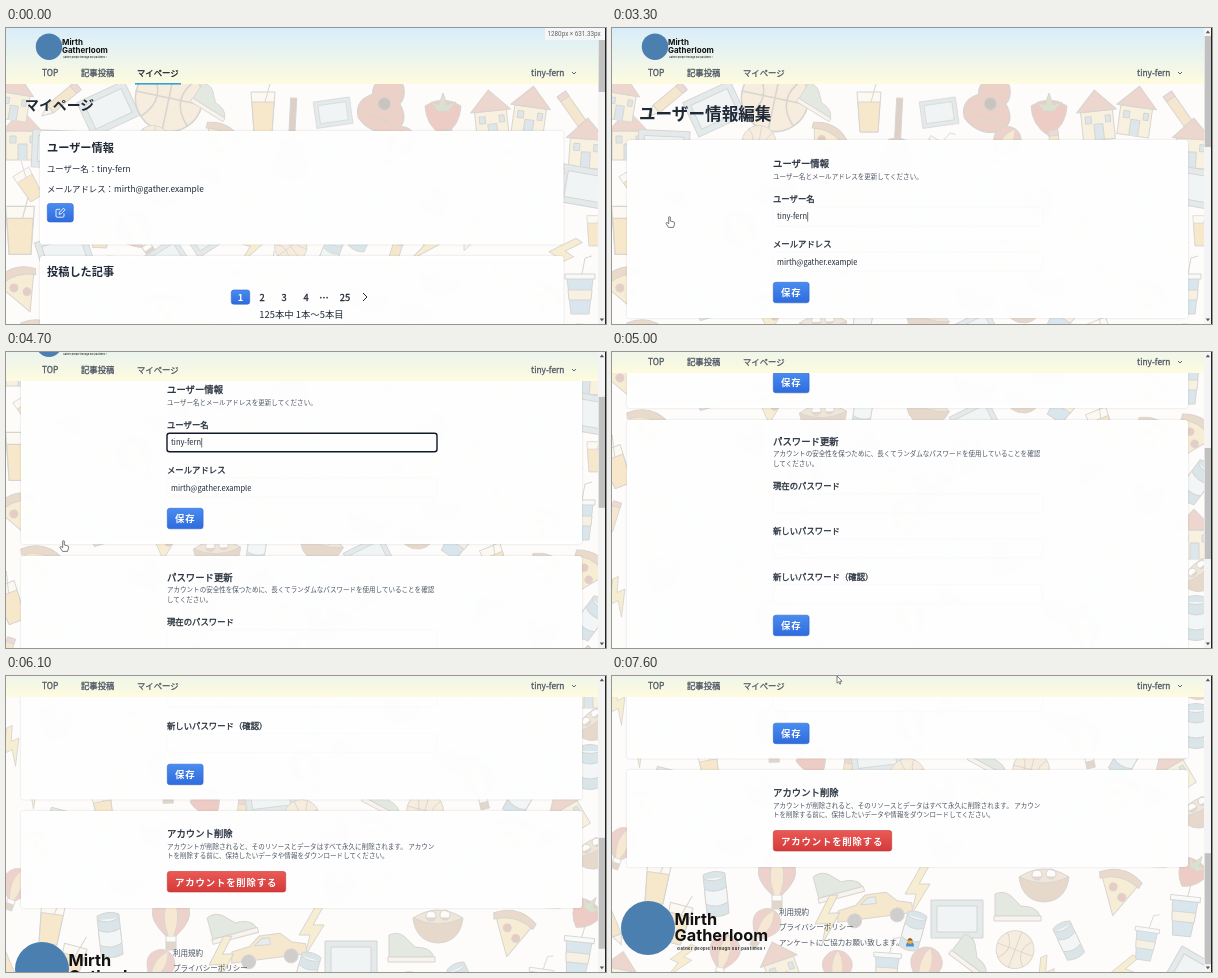
An HTML page that plays this animation: 600x296 px, repeating every 7700 ms.

```html
<!DOCTYPE html>
<html lang="ja">
<head>
<meta charset="utf-8">
<title>マイページ</title>
<style>
html, body { margin: 0; width: 100%; height: 100%; overflow: hidden; background: #fff; }
svg { display: block; width: 100vw; height: 100vh; }
text { font-family: "Noto Sans CJK JP", "Noto Sans CJK", "Noto Sans", sans-serif; white-space: pre; }
.brand text { font-family: Inter, sans-serif; font-weight: 700; }
.card { fill: #fffffff8; filter: drop-shadow(0 .8px 1.2px #0002); }
.doodle { stroke: #85796c; stroke-width: 1; stroke-linejoin: round; filter: saturate(.75); }
</style>
</head>
<body>
<svg viewBox="0 0 600 296">
  <defs>
    <linearGradient id="sky" x2="0" y2="1"><stop stop-color="#d8edfb"/><stop offset="1" stop-color="#fefbdf"/></linearGradient>
    <linearGradient id="blue" x2="0" y2="1"><stop stop-color="#4a8cf0"/><stop offset="1" stop-color="#2f6bdc"/></linearGradient>
    <linearGradient id="red" x2="0" y2="1"><stop stop-color="#ea5a55"/><stop offset="1" stop-color="#d43a3a"/></linearGradient>
  </defs>
  <rect width="600" height="296" fill="#fdfcfb"/>
  <g id="scroller"><g id="doodles" opacity=".3"></g><g id="profile"></g><g id="edit"></g></g>
  <g id="head"></g>
  <g id="bar"></g>
  <g id="size"></g>
  <path id="arrow" d="M0 0V7.2L1.7 5.7 2.8 8.2 3.9 7.7 2.8 5.3H5Z" fill="#fff" stroke="#333" stroke-width=".6"/>
  <path id="hand" d="M-.8 0Q0-.8.8 0V4L4.6 5Q5.3 5.4 5 7.2L4 10.4H-1L-3.4 6.6Q-3.6 5.2-2 5.8L-.8 6.8Z" fill="#fff" stroke="#444" stroke-width=".7"/>
</svg>
<script>
const $ = id => document.getElementById(id);
const INK = "#1f2937", GRAY = "#4b5563", USER = "tiny-fern", MAIL = "mirth@gather.example";

// Text placed by its left edge and vertical middle; medium weight is a thin outline
const text = (x, mid, size, str, weight = 400, fill = INK, extra = "") =>
  `<text x="${x}" y="${mid + size * .38}" font-size="${size}" font-weight="${weight == 500 ? 400 : weight}" fill="${fill}" ${
    weight == 500 ? `stroke="${fill}" stroke-width="${size * .03}"` : ""} ${extra}>${str}</text>`;
const box = (x, y, w, h, r, attrs) => `<rect x="${x}" y="${y}" width="${w}" height="${h}" rx="${r}" ${attrs}/>`;
const card = (x, y, w, h) => box(x, y, w, h, 3, 'class="card"');
const button = (x, y, w, h, hue) =>
  box(x, y, w, h, 2.5, `fill="url(#${hue})" stroke="${hue == "red" ? "#c63434" : "#2c66cf"}" stroke-width=".6"`);
const path = (d, attrs) => `<path d="${d}" ${attrs}/>`;
const brand = (x, y, k) => `<g class="brand" transform="translate(${x} ${y}) scale(${k})">
  <circle r="27" fill="#4a7fb0"/>
  ${text(26.5, -9.5, 16.3, "Mirth", 700, "#111")}${text(26.5, 6.5, 16.3, "Gatherloom", 700, "#111")}
  ${text(29, 20.7, 4, "Gather people through our pastimes !", 600, "#222", 'letter-spacing=".45"')}</g>`;

// Background doodles, each about 45 px tall around its own origin
const shape = (d, fill) => path(d, `fill="${fill}"`);
const kinds = {
  ball: shape("M-21 0a21 21 0 1 0 42 0a21 21 0 1 0-42 0", "#f6c98a") + shape("M-21 0H21M0-21V21M-15-15Q0 0-15 15M15-15Q0 0 15 15", "none"),
  glass: shape("M-12-18H12L9 22H-9Z", "#fbf0d2") + shape("M-11-8H11L9 22H-9Z", "#f7b93c") + shape("M2-8L8-30", "none"),
  house: shape("M-16-5H16V24H-16Z", "#f7d58d") + shape("M-20-5L0-26 20-5Z", "#d9775a") + shape("M-4 24V8H5V24M-12 0H-6V7H-12ZM8 0H13V7H8Z", "#8db3c9"),
  guitar: shape("M-3-10H3V-52H-3Z", "#9a6843") + shape("M-9-10Q0-14 9-10Q14-2 11 4Q23 14 15 25Q0 35-15 25Q-23 14-11 4Q-14-2-9-10", "#d9683e") + shape("M-5 8a5 5 0 1 0 10 0a5 5 0 1 0-10 0M-7 20H7", "#5b3b2b"),
  pencil: shape("M-5-22H5V14H-5Z", "#f2b544") + shape("M-5 14H5L0 25Z", "#f3dfc2") + shape("M-5-22H5V-16H-5Z", "#e5817a"),
  pizza: shape("M-20-14Q0-26 20-14L2 24Z", "#f6c75d") + shape("M-22-15Q0-30 22-15L20-9Q0-20-20-9Z", "#c98748") + shape("M-9-4a4 4 0 1 0 8 0a4 4 0 1 0-8 0M2 4a4 4 0 1 0 8 0a4 4 0 1 0-8 0", "#d5513f"),
  cup: shape("M-13-12H13L9 24H-9Z", "#79b6d8") + shape("M-15-16H15V-11H-15Z", "#eef4f5") + shape("M2-16L5-32 12-34", "none") + shape("M-12 0H12L11 10H-11Z", "#f3d69b"),
  can: shape("M-11-20Q0-25 11-20V20Q0 25-11 20Z", "#7fb0cb") + shape("M-11-16Q0-11 11-16M-11-6Q0 0 11-6V9Q0 15-11 9Z", "#d8e8ee"),
  balloon: shape("M-5 14Q-22-2-18-14Q-12-27 0-27Q12-27 18-14Q22-2 5 14Z", "#e26650") + shape("M-3 14Q-12-10 0-27Q12-10 3 14", "#f5b85d") + shape("M-5 20H5V28H-5ZM-5 14V20M5 14V20", "#a97a4c"),
  car: shape("M-38 9L-36-2-18-5-7-14H14L24-4 38 0V10Z", "#f3b83f") + shape("M-13-5L-5-11H3V-4Z", "#a7cbd9") + shape("M-28 10a7 7 0 1 0 14 0a7 7 0 1 0-14 0M15 10a7 7 0 1 0 14 0a7 7 0 1 0-14 0", "#65615e"),
  tablet: shape("M-26-18H26V20H-26Z", "#a3bfca") + shape("M-20-12H20V14H-20Z", "#d3e2e7"),
  bowl: shape("M-25-4Q-22 20 0 21Q22 20 25-4Z", "#c08450") + shape("M-25-4Q0-20 25-4Q0 8-25-4M-12-6a5 5 0 1 0 10 0a5 5 0 1 0-10 0M2-7a5 5 0 1 0 10 0a5 5 0 1 0-10 0", "#d9ad78"),
  boot: shape("M-22 12V-10Q-13-14-6-8L4 2Q20 2 23 12Z", "#a6b9a0") + shape("M-23 12H24V17H-23Z", "#efe2cc"),
  berry: shape("M-18-8Q0-20 18-8Q17 12 0 22Q-17 12-18-8", "#e7553f") + shape("M-12-12L-4-9 0-21 4-9 13-12 5-3H-5Z", "#86a957"),
  bolt: shape("M4-24L-12 4H-1L-6 25 13-6H2L12-24Z", "#f7cc55")
};
const places = `house 16 108 0,pencil 55 72 50,tablet 102 80 -25,ball 163 70 12 1.6,glass 257 82 0,guitar 285 122 3,tablet 327 84 -8 .7,
guitar 382 66 20 1.3,berry 437 86 0,house 485 88 -6,house 524 84 8,pencil 568 84 -35,house 580 116 4,glass 14 200 0 1.2,pizza 14 262 -20,
tablet 580 158 10,cup 574 262 0,house 582 417 0,can 584 500 0,glass 45 655 8,can 104 668 -6,balloon 165 655 0,boot 225 655 -15,
car 262 682 -8,bolt 305 664 0,tablet 345 692 0,bowl 432 655 0,boot 405 678 0,pizza 505 666 15,cup 572 686 6`
  .split(",").map(p => p.trim().split(" "));

// Seeded doodles fill every spot that is still free
let seed = 7;
const rand = () => (seed = seed * 16807 % 2147483647) / 2147483647;
const names = Object.keys(kinds).filter(k => k != "guitar" && k != "car");
for (let i = 0; i < 4000; i++) {
  const x = rand() * 592, y = 62 + rand() * 690;
  if (places.every(p => Math.hypot(p[1] - x, p[2] - y) > 37))
    places.push([names[rand() * names.length | 0], x, y, rand() * 80 - 40, .75 + rand() * .25]);
}
$("doodles").innerHTML = '<g class="doodle">' + places.map(([kind, x, y, turn, k = 1]) =>
  `<g transform="translate(${x} ${y}) rotate(${turn}) scale(${k})">${kinds[kind]}</g>`).join("") + "</g>";

$("head").innerHTML = box(0, 0, 592, 56, 0, 'fill="url(#sky)"') + brand(43, 18.7, .49)
  + text(36, 45, 8.4, "TOP", 500, GRAY) + text(75, 45, 8.4, "記事投稿", 500, GRAY)
  + `<g id="here">${text(131, 45, 8.4, "マイページ", 500, "currentColor")}</g>`
  + box(129, 55, 46, 1.6, 0, 'id="underline" fill="#2ea3dc"')
  + text(525, 45, 8.4, USER, 500, GRAY)
  + path("M566 44L568 46 570 44", `fill="none" stroke="${GRAY}" stroke-width=".9"`);

const pages = [[256, "2"], [278, "3"], [300, "4"], [318, "…"], [339, "25"]];
$("profile").innerHTML = text(19, 77, 13.9, "マイページ", 700)
  + card(34, 103, 523.5, 113.5) + text(41, 120, 11.2, "ユーザー情報", 700)
  + text(41, 141, 8.4, "ユーザー名：" + USER) + text(41, 161.3, 8.4, "メールアドレス：" + MAIL)
  + button(41.3, 175.5, 26, 18.5, "blue") + box(41.3, 175.5, 26, 18.5, 2.5, 'id="hover" fill="#1d48b4"')
  + path("M54 181.3H51.2Q50 181.3 50 182.5V188Q50 189.2 51.2 189.2H56.8Q58 189.2 58 188V185.4M53 186.3L53.5 184.2 57.5 180.2 59.1 181.8 55.1 185.8Z", 'fill="none" stroke="#fff" stroke-width=".9" stroke-linejoin="round"')
  + card(34, 228, 523.5, 120) + text(41, 243.5, 11.2, "投稿した記事", 700)
  + button(225.3, 262, 18.4, 14.2, "blue") + text(234.5, 269.7, 9.4, "1", 700, "#fff", 'text-anchor="middle"')
  + pages.map(([x, s]) => text(x, 269.7, 9.4, s, 500, INK, 'text-anchor="middle"')).join("")
  + path("M357 265L361 269 357 273", `fill="none" stroke="${INK}"`)
  + text(295.5, 286.6, 9.4, "125本中 1本〜5本目", 400, INK, 'text-anchor="middle"');

const field = (y, label) => text(161, y, 8.4, label, 500) + box(161, y + 8, 270, 19, 3, 'fill="none" stroke="#f8f8fa" stroke-width=".6"');
const save = y => button(161.3, y, 35.8, 20.5, "blue") + text(169, y + 10.5, 9.4, "保存", 700, "#fff", 'letter-spacing=".8"');
const note = (y, str) => text(161, y, 6.54, str, 400, GRAY);
$("edit").innerHTML = text(27, 86, 16.6, "ユーザー情報編集", 700)
  + card(15, 112, 561, 178) + text(161, 135, 9.4, "ユーザー情報", 500)
  + note(148.5, "ユーザー名とメールアドレスを更新してください。")
  + field(171, "ユーザー名") + box(161, 179.2, 270, 18.6, 2.5, 'id="ring" fill="none" stroke="#111827" stroke-width="1.4"')
  + text(165, 188.5, 7.5, USER) + path("M195.7 184V193.5", 'stroke="#111" stroke-width=".6"')
  + field(216, "メールアドレス") + text(165, 234, 7.5, MAIL) + save(254.3)
  + card(15, 302, 561, 230.5) + text(161, 323, 9.4, "パスワード更新", 500)
  + note(336, "アカウントの安全性を保つために、長くてランダムなパスワードを使用していることを確認") + note(345.5, "してください。")
  + field(368, "現在のパスワード") + field(413, "新しいパスワード") + field(458.5, "新しいパスワード（確認）") + save(497.2)
  + card(15, 544, 561, 97) + text(161, 566.3, 9.4, "アカウント削除", 500)
  + note(579.3, "アカウントが削除されると、そのリソースとデータはすべて永久に削除されます。 アカウン")
  + note(588.8, "トを削除する前に、保持したいデータや情報をダウンロードしてください。")
  + button(161.3, 604.5, 118.4, 20.5, "red") + text(169, 615, 9.4, "アカウントを削除する", 700, "#fff", 'letter-spacing=".85"')
  + brand(36, 702, 1)
  + text(167, 686, 7.5, "利用規約", 400, GRAY) + text(167, 701, 7.5, "プライバシーポリシー", 400, GRAY)
  + text(167, 716, 7.4, "アンケートにご協力お願い致します。", 400, GRAY)
  + '<path d="M294 720.5Q294 715.5 298 715.5T302 720.5Z" fill="#4b8fcf"/><circle cx="298" cy="715" r="2.8" fill="#f2b53f"/><path d="M295.2 714.5Q298 709.5 300.8 714.5Z" fill="#8a5a3a"/>';

$("bar").innerHTML = box(592, 0, 8, 296, 0, 'fill="#f4f4f4"') + box(592.7, 8, 6.3, 56, 0, 'id="thumb" fill="#c1c1c1"')
  + path("M593.7 5.2L595.9 2.6 598.1 5.2ZM593.7 290.6L595.9 293.2 598.1 290.6Z", 'fill="#555"')
  + box(599, 0, 1, 296, 0, 'fill="#222"');
$("size").innerHTML = box(539, 0, 60, 12, 0, 'fill="#f5f6f7"') + text(541.5, 6, 6.3, "1280px × 631.33px", 400, "#666", 'style="font-family:Roboto,sans-serif"');

// Piecewise linear value through [time, value] pairs
function along(keys, t) {
  const i = keys.findIndex(k => k[0] > t);
  if (i == 0) return keys[0][1];
  if (i < 0) return keys[keys.length - 1][1];
  const [[t0, a], [t1, b]] = [keys[i - 1], keys[i]];
  return a + (b - a) * (t - t0) / (t1 - t0);
}
const scrollKeys = [[4300, 0], [4500, 40], [4700, 98], [4900, 205], [5000, 234], [5200, 234], [5300, 265], [5400, 281], [5500, 281],
  [5600, 317], [5800, 366], [5900, 375], [6000, 375], [6100, 409], [6200, 438], [6300, 450]];
const headKeys = [[4300, 0], [4700, 27], [4800, 35]];
const show = (id, on) => $(id).setAttribute("display", on ? "inline" : "none");
const move = (id, x, y) => $(id).setAttribute("transform", `translate(${x} ${y})`);

function draw(now) {
  const t = Math.floor(now % 7700 / 100) * 100;
  const editing = t >= 3300, scroll = along(scrollKeys, t);
  show("size", t < 800);
  show("profile", !editing);
  show("edit", editing);
  show("underline", !editing);
  show("ring", t >= 3400);
  $("here").setAttribute("color", editing ? GRAY : "#111827");
  $("hover").setAttribute("opacity", along([[1700, 0], [1900, .65]], t));
  move("scroller", 0, -scroll);
  move("head", 0, -along(headKeys, t));
  $("thumb").setAttribute("y", 8 + scroll * .376);
  $("thumb").setAttribute("height", editing ? 111 : 56);

  const leaving = t >= 7100;
  show("arrow", t >= 1000 && t < 1700 || leaving);
  show("hand", t >= 1700 && t < 5000);
  const p = leaving ? (t - 7100) / 500 : (t - 1000) / 700, ease = p * (2 - p);
  if (leaving) move("arrow", 57 + 168 * ease, 189 - 189 * ease);
  else move("arrow", 228 - 170 * ease, 146 + 42.5 * ease);
  move("hand", 57.5, 189);
  requestAnimationFrame(() => draw(performance.now()));
}
draw(performance.now());
</script>
</body>
</html>
```
